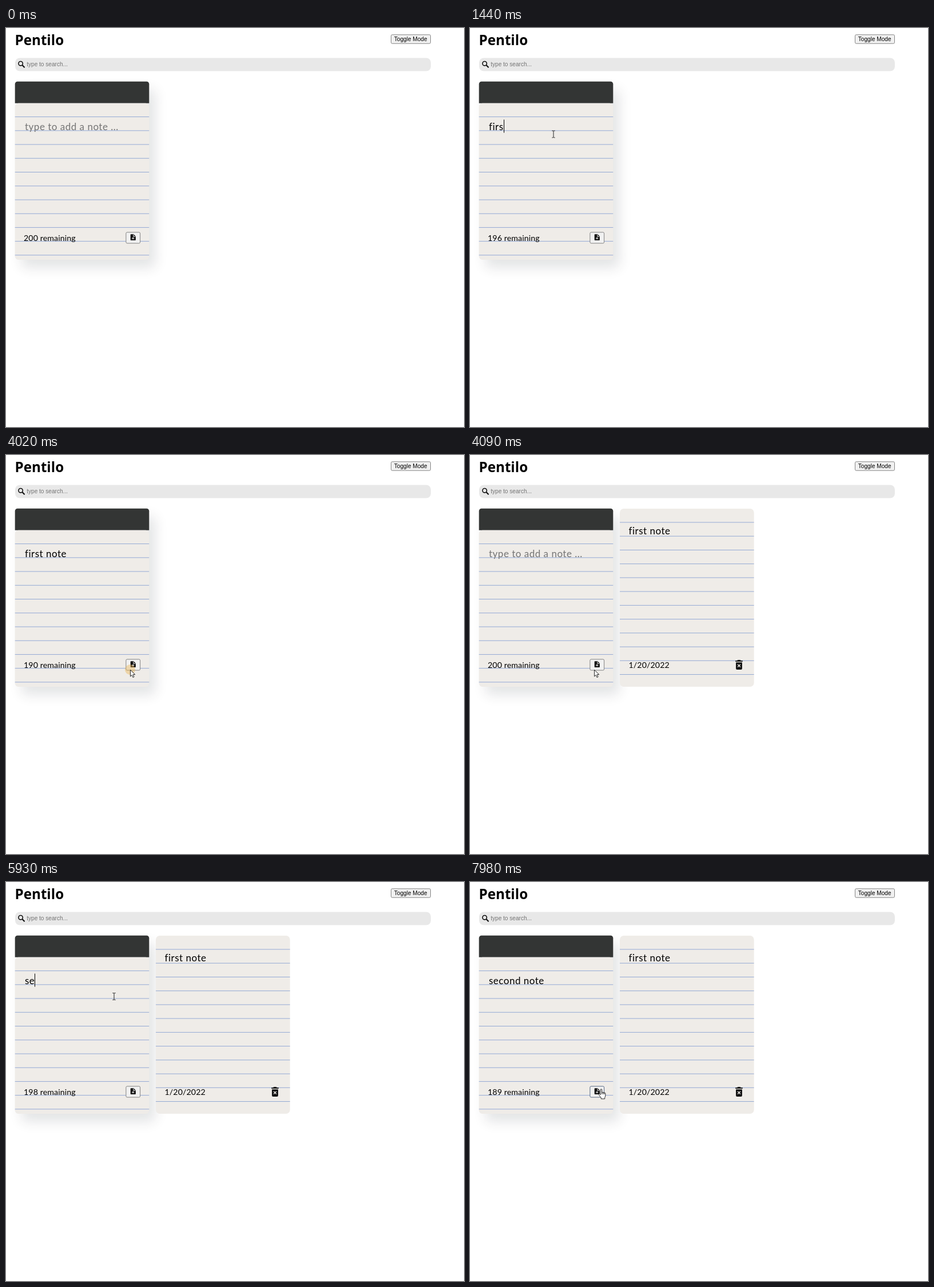
These frames come from a looping animation (801x699 px, 8000 ms). An HTML page:

```html
<!DOCTYPE html>
<html lang="en">
<head>
<meta charset="utf-8">
<title>Notes</title>
<style>
  html, body { margin: 0; width: 100%; height: 100%; overflow: hidden; background: #fff; }
  svg { display: block; width: 801px; height: 699px; }
  text { white-space: pre; }
  .title { font: 700 24.2px "Open Sans", sans-serif; }
  .ui { font: 10.1px "Liberation Sans", Arial, sans-serif; }
  .hand { font: 17px "Comic Sans MS", "Comic Neue", Lato, sans-serif; letter-spacing: .5px; }
  .small { font-size: 14.2px; letter-spacing: .1px; }
  .rule { stroke: #8fa6d4; stroke-width: .95; }
  .paper { fill: #efece8; }
  .button { fill: #f1f1f1; stroke: #767676; stroke-width: .9; }
  .pointer { fill: #fff; stroke: #111; stroke-width: .9; stroke-linejoin: round; }
</style>
</head>
<body>
<svg viewBox="0 0 801 699" xmlns="http://www.w3.org/2000/svg">
  <defs>
    <filter id="soft" x="-30%" y="-30%" width="160%" height="160%">
      <feGaussianBlur stdDeviation="11"/>
    </filter>
  </defs>

  <text class="title" x="15.5" y="29.6">Pentilo</text>
  <rect class="button" x="673.5" y="11.8" width="69" height="15.4" rx="2"/>
  <text class="ui" x="678.8" y="23.2">Toggle Mode</text>

  <rect x="16" y="52.5" width="727" height="23" rx="8" fill="#e8e8e8"/>
  <g fill="none" stroke="#111">
    <circle cx="25.6" cy="62.2" r="3.7" stroke-width="1.6"/>
    <path d="M28.4 65l4.2 4.2" stroke-width="2.1"/>
  </g>
  <text class="ui" x="36.2" y="67.3" fill="#757575">type to search...</text>

  <rect x="27" y="108" width="234" height="312" rx="7" fill="#1c2c30" opacity=".12" filter="url(#soft)"/>
  <path d="M15.7 131.7V98.2a4.5 4.5 0 0 1 4.5-4.5h225.6a4.5 4.5 0 0 1 4.5 4.5v33.5z" fill="#333534"/>
  <rect class="paper" x="15.7" y="131.7" width="234.6" height="274.3" rx="6"/>
  <g id="rules1"></g>
  <text id="note" class="hand" x="33" y="178.8"></text>
  <text id="count" class="hand small" x="31" y="372.7"></text>
  <rect id="add" class="button" x="209.9" y="357.9" width="24.7" height="19.2" rx="2"/>
  <path d="M218.7 361.2h4.5l3.7 3.7v6.1a1 1 0 0 1-1 1h-7.2a1 1 0 0 1-1-1v-8.8a1 1 0 0 1 1-1z" fill="#111"/>
  <path d="M222.9 361.9v3.4h3.4M222.2 366.3v4.2M220.1 368.4h4.2" fill="none" stroke="#f1f1f1" stroke-width="1"/>
  <path id="caret" d="M0 160.5v23" stroke="#000" stroke-width="1"/>

  <g id="saved">
    <rect class="paper" x="262" y="94" width="234.7" height="312" rx="7"/>
    <g id="rules2"></g>
    <text class="hand" x="277.5" y="139.2">first note</text>
    <text class="hand small" x="277.5" y="372.7">1/20/2022</text>
    <path d="M464.2 360.2h3.1l1-1.1h4.4l1 1.1h3.1v1.9h-12.6zM465.1 363.2h10.8v10.8a1.9 1.9 0 0 1-1.9 1.9h-7a1.9 1.9 0 0 1-1.9-1.9z" fill="#111"/>
    <path d="M468.1 366.8l4.8 4.8m0-4.8l-4.8 4.8" stroke="#efece8" stroke-width="1.4"/>
  </g>

  <circle id="click" r="9" fill="#eab75c" opacity=".45"/>
  <g id="cursor">
    <path id="beam" d="M-2.6 -6h2l.6 .6 .6-.6h2M0 -5.4v11M-2.6 6h2l.6-.6 .6 .6h2" fill="none" stroke="#222" stroke-width="1"/>
    <path id="arrow" class="pointer" d="M0 0v11.4l2.7-2.5 1.8 4.2 2-.9-1.8-4.1h3.6z"/>
    <path id="hand" class="pointer" d="M-1.2 1a1.2 1.2 0 0 1 2.4 0v4.6q1.1-.8 2.2.2 1.2-.6 2 .4 1.7-.3 1.9 1.4v3.6q0 2-1.1 3.3v2.4h-6.4v-1.9q-2-2.4-4-5.4c-.6-1.6 1-2 2-1l1 1.2zM1.2 5.6v3.2M3.4 5.8v3M5.4 6.2v2.7"/>
  </g>
</svg>
<script>
const LOOP = 8000, STEP = 66;
const $ = id => document.getElementById(id);

// [time, visible text]
const typing = [
  [0, ""], [920, "f"], [1050, "fi"], [1180, "fir"], [1440, "firs"], [1640, "first"],
  [1710, "first "], [2170, "first n"], [2440, "first no"], [2500, "first not"], [2700, "first note"],
  [4090, ""], [5730, "s"], [5930, "se"], [6130, "seco"], [6330, "secon"], [6390, "second"],
  [6530, "second "], [6660, "second n"], [6790, "second no"], [6860, "second not"], [7050, "second note"]
];
// spans [from, to, ...]
const caretOn = [[310, 790], [920, 3230], [3760, 3900], [5270, 7580]];
const clicks = [[310, 390, 146, 186], [4020, 4090, 217, 376], [5270, 5410, 188, 200]];
// pointer moves: start, end, then waypoints
const moves = [
  [70, 310, [359, 60], [270, 120], [146, 186]],
  [3160, 3760, [146, 186], [168, 265], [208, 350], [217.5, 376.5]],
  [4550, 5140, [217.5, 376.5], [275, 345], [319, 282], [240, 222], [190, 201.5]],
  [5140, 5270, [190, 201.5], [189, 200.5]],
  [7450, 7980, [189, 200.5], [195, 250], [216, 335], [229.5, 363]]
];

function drawRules(id, x, y, width, count) {
  let d = "";
  for (let i = 0; i < count; i++) d += `M${x} ${y + i * 24.23}h${width}`;
  $(id).innerHTML = `<path class="rule" d="${d}"/>`;
}

const last = (list, t) => list.filter(item => item[0] <= t).pop();
const active = (list, t) => list.find(([a, b]) => t >= a && t < b);
const show = (id, on) => $(id).setAttribute("visibility", on ? "visible" : "hidden");

function pointerAt(t) {
  const [a, b, ...points] = last(moves, t);
  const held = t >= b ? b : a + Math.floor((t - a) / STEP) * STEP;
  const p = (held - a) / (b - a);
  const f = p * p * (3 - 2 * p) * (points.length - 1);
  const i = Math.min(Math.floor(f), points.length - 2);
  return [0, 1].map(k => points[i][k] + (points[i + 1][k] - points[i][k]) * (f - i));
}

function pointerKind(x, y) {
  if (x > 209 && x < 235 && y > 357 && y < 375) return "hand";
  const inField = x > 31 && x < 235 && y > 150 && y < 345;
  const inSearch = x > 36 && x < 743 && y > 52 && y < 76;
  return inField || inSearch ? "beam" : "arrow";
}

function render(t) {
  const text = last(typing, t)[1];
  const note = $("note");
  note.textContent = text || "type to add a note ...";
  note.setAttribute("fill", text ? "#000" : "#757575");
  $("count").textContent = `${200 - text.length} remaining`;

  const width = text ? note.getComputedTextLength() : 0;
  $("caret").setAttribute("transform", `translate(${Math.round(33 + width) + .5})`);
  show("caret", active(caretOn, t));
  show("saved", t >= 4090);

  const click = active(clicks, t);
  show("click", click);
  if (click) $("click").setAttribute("transform", `translate(${click[2]} ${click[3]})`);

  let kind = "";
  if (t >= moves[0][0]) {
    const [x, y] = pointerAt(t);
    kind = pointerKind(x, y);
    $("cursor").setAttribute("transform", `translate(${x} ${y})`);
  }
  for (const id of ["beam", "arrow", "hand"]) show(id, id === kind);
  $("add").style.stroke = kind === "hand" ? "#465a78" : "";
}

drawRules("rules1", 15.7, 155.6, 234.6, 11);
drawRules("rules2", 262, 118, 234.7, 12);

const start = performance.now();
function tick() {
  render((performance.now() - start) % LOOP);
  requestAnimationFrame(tick);
}
tick();
</script>
</body>
</html>
```
